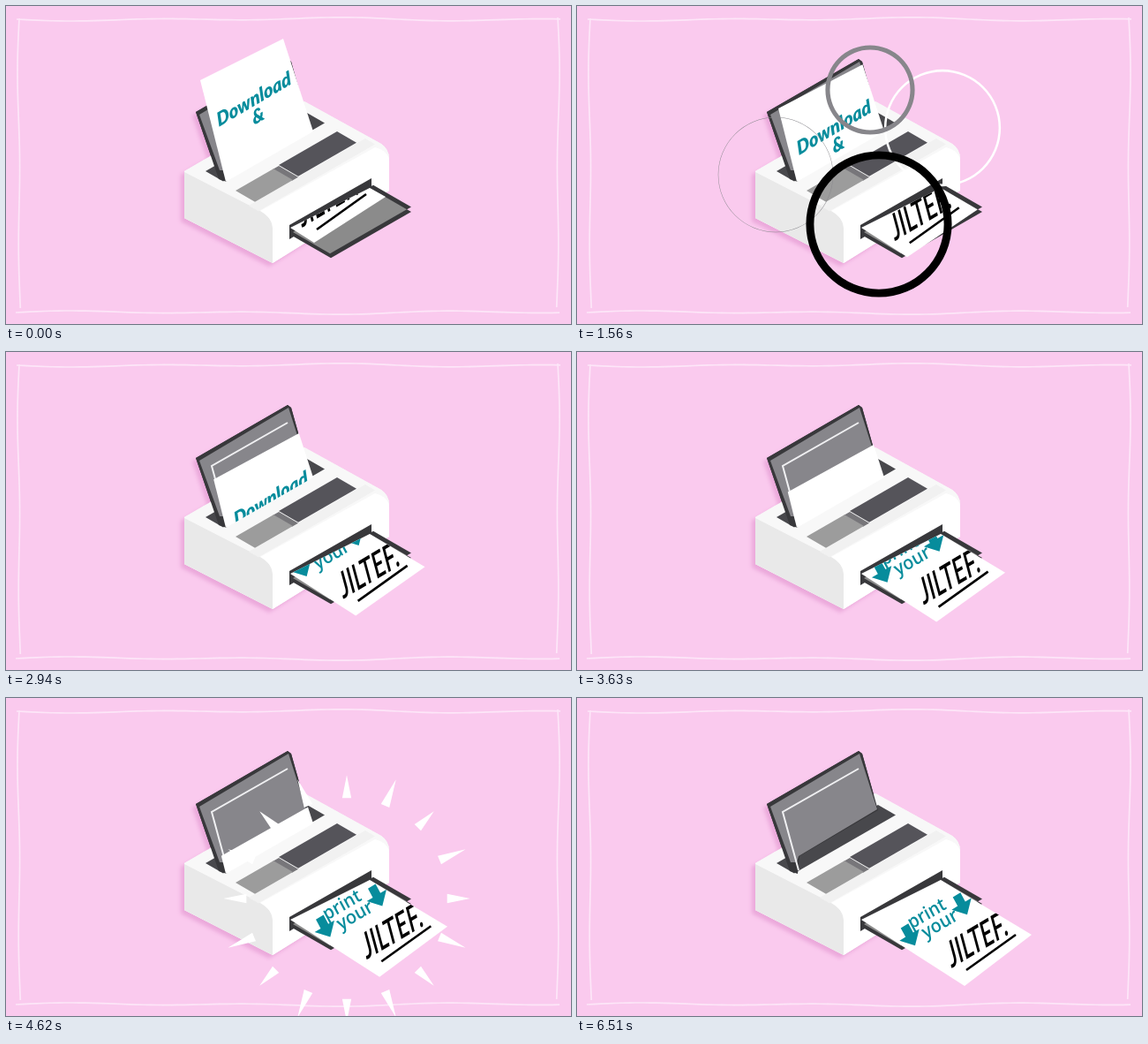
Recreate the animation shown at these times as an HTML page with a canvas. Size 640 px wide and 360 px high, loop 6540 ms.

```html
<!DOCTYPE html>
<html lang="en">
<head>
<meta charset="utf-8">
<title>Printer</title>
<style>
html, body { margin: 0; width: 100%; height: 100%; overflow: hidden; background: #facaee; }
canvas { display: block; }
</style>
</head>
<body>
<canvas id="stage" width="640" height="360"></canvas>
<script>
const ctx = document.getElementById('stage').getContext('2d');
const LOOP = 6540, FEED = 5610, POP = 990;
const PINK = '#facaee', TEAL = '#078c9c', DARK = '#38383b', GREY = '#87868b';
const SLOPE = .575; // rise of the isometric axes
const mix = (a, b, p) => a + (b - a) * p;
const easeOut = p => 1 - (1 - p) ** 3;

const rings = [
  { x: 321, y: 179, start: 300, radius: 111, color: '#fff' },
  { x: 247, y: 100, start: 540, radius: 40, color: '#000' },
  { x: 225, y: 191, start: 593, radius: 65, color: GREY },
  { x: 414, y: 138, start: 700, radius: 65, color: '#fff' },
  { x: 332, y: 95, start: 907, radius: 50, color: GREY },
  { x: 342, y: 247, start: 930, radius: 82, color: '#000' }
];

function fillPath(color, d) {
  ctx.fillStyle = color;
  ctx.fill(new Path2D(d));
}

function strokePath(color, width, d) {
  ctx.strokeStyle = color;
  ctx.lineWidth = width;
  ctx.stroke(new Path2D(d));
}

// Flat isometric panel: u runs up to the right, v down to the right
function panel(color, x, y, u, v) {
  fillPath(color, `M${x} ${y}l${u} ${-u * SLOPE}l${v} ${v * SLOPE}l${-u} ${u * SLOPE}Z`);
}

// Draws in the plane of a sheet, with its origin at x, y
function onSheet(x, y, slant, draw, narrow = 1) {
  ctx.save();
  ctx.transform(.86 * narrow, -.51 * narrow, slant, .93, x, y);
  draw();
  ctx.restore();
}

function label(text, font, color, x, y, slant, narrow) {
  onSheet(x, y, slant, () => {
    ctx.font = font;
    ctx.fillStyle = color;
    ctx.fillText(text, 0, 0);
  }, narrow);
}

// White sheet that clips what is drawn on it
function sheet(d, draw) {
  ctx.save();
  const path = new Path2D(d);
  ctx.fillStyle = '#fff';
  ctx.fill(path);
  ctx.clip(path);
  draw();
  ctx.restore();
}

function border() {
  const side = (length, place) => {
    ctx.beginPath();
    for (let s = 0; s <= length; s += 8) {
      ctx.lineTo(...place(s, 1.3 * Math.sin(s / 34) + Math.sin(s / 71)));
    }
    ctx.stroke();
  };
  ctx.strokeStyle = '#fde6f8';
  ctx.lineWidth = 1.7;
  side(616, (s, w) => [12 + s, 15 + w]);
  side(616, (s, w) => [11 + s, 347 - w]);
  side(332, (s, w) => [15 - w, 14 + s]);
  side(332, (s, w) => [625 + w, 13 + s]);
}

function body() {
  const outline = 'M202 187L338 108L425 156Q434 162 434 173V209L302 291L202 240Z';
  const tray = 'M215 120L319 60L323 63L341 127L252 179L250 199L241 196Z';
  ctx.save();
  ctx.shadowColor = '#eba9db';
  ctx.shadowBlur = 4;
  ctx.shadowOffsetX = -4;
  ctx.shadowOffsetY = 4;
  fillPath('#f8f8f8', outline);
  fillPath(DARK, tray);
  ctx.restore();

  fillPath('#f8f8f8', outline);
  fillPath('#e9e9e9', 'M202 188L288 232Q302 240 302 252V291L202 240Z');
  fillPath('#fff', 'M288 232L418 160Q434 164 434 176V209L302 291V252Q302 240 288 232Z');
  panel('#f1f1f1', 275, 226, 132, 11);

  panel('#77767a', 302, 185, 7, 22);
  panel('#9c9c9c', 260, 209, 43, 22);
  panel('#55545a', 309, 180, 66, 22);

  panel('#48484c', 226, 187, 115, 20);
  fillPath(DARK, tray);
  fillPath(GREY, 'M219 123L320 63L340 126L251 179L249 186L242 186Z');
  strokePath('#f0f0f2', 2, 'M319 80L233 129L251 195');
}

function inputSheet(t) {
  const p = t / FEED;
  if (p >= 1) return;
  const left = [mix(220, 249, p), mix(84, 199, p)];
  const right = [mix(314, 348, p), mix(37, 142, p)];
  sheet(`M${left}L${right}L348 142L249 199Z`, () => {
    ctx.translate(t * .0066, t * .0206);
    const font = 'italic 900 22px Lato, sans-serif';
    label('Download', font, TEAL, 241, 137, .25);
    label('&', font, TEAL, 281, 135, .25);
  });
}

function arrow(x, y) {
  onSheet(x, y, .5, () => fillPath(TEAL, 'M-5 -12H5V-1H13L0 12L-13 -1H-5Z'));
}

function outputSheet(t) {
  fillPath(DARK, 'M321 248L414 195V209L321 264Z');
  panel(DARK, 324, 260, 91, 44);
  panel(DARK, 325, 255, 91, 43);
  panel('#8b8b8b', 325, 256, 87, 42);

  const p = Math.min(t / FEED, 1);
  const right = [mix(430, 515, p), mix(216, 268, p)];
  const front = [mix(349, 439, p), mix(268, 326, p)];
  sheet(`M322 251L412 206L${right}L${front}Z`, () => {
    ctx.translate(mix(-89, 0, p), mix(-55, 0, p));
    const font = '600 20px "Open Sans", sans-serif';
    label('print', font, TEAL, 379, 262, .5);
    label('your', font, TEAL, 395, 273, .5);
    arrow(377, 269);
    arrow(436, 234);
    label('JILTEF.', '600 42px Lato, sans-serif', '#000', 424, 306, .25, .6);
    strokePath('#000', 2.6, 'M441 308L497 268');
  });
}

function ring(t, { x, y, start, radius, color }) {
  const p = (t - start) / POP;
  if (p <= 0 || p >= 1) return;
  const r = radius * easeOut(p), half = .15 * radius * (1 - p);
  ctx.beginPath();
  ctx.arc(x, y, r + half, 0, 2 * Math.PI);
  ctx.arc(x, y, Math.max(r - half, 0), 0, 2 * Math.PI, true);
  ctx.fillStyle = color;
  ctx.fill();
}

function burst(t) {
  const p = (t - 4230) / POP;
  if (p <= 0 || p >= 1) return;
  const inner = 146 * easeOut(p), half = 8.5 * (1 - p);
  for (let i = 0; i < 16; i++) {
    const length = (i % 2 ? 53 : 43) * (1 - p);
    ctx.save();
    ctx.translate(386, 227);
    ctx.rotate(i * Math.PI / 8);
    fillPath('#fff', `M${inner} ${-half}l${length} ${half}l${-length} ${half}Z`);
    ctx.restore();
  }
}

function draw(t) {
  ctx.fillStyle = PINK;
  ctx.fillRect(0, 0, 640, 360);
  border();
  body();
  inputSheet(t);
  outputSheet(t);
  rings.forEach(r => ring(t, r));
  burst(t);
}

const begin = performance.now();
function frame() {
  draw((performance.now() - begin) % LOOP);
  requestAnimationFrame(frame);
}
frame();
</script>
</body>
</html>
```
